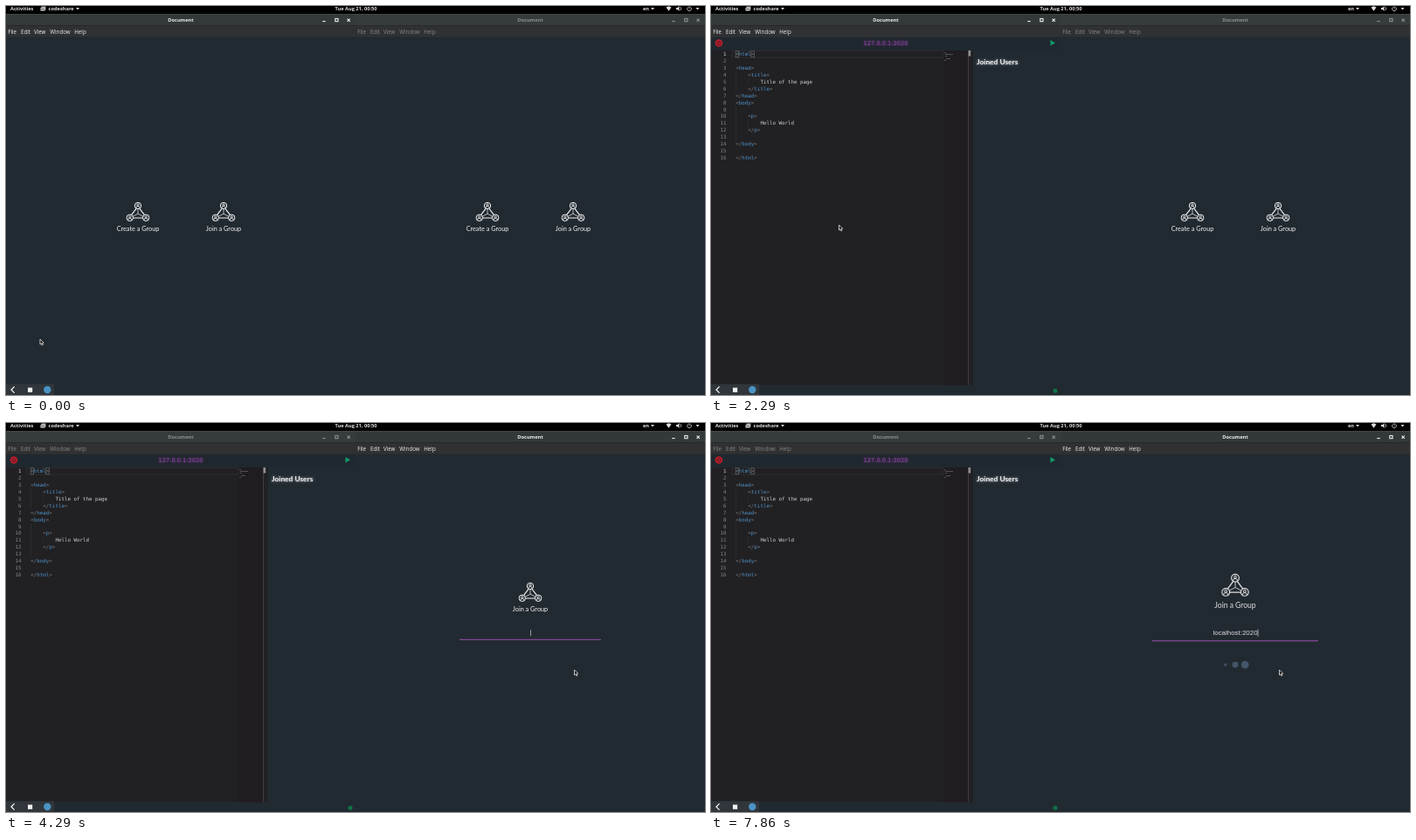
These frames come from a looping animation (800x446 px, 8 s). An HTML page with a canvas:

```html
<!DOCTYPE html>
<html lang="en">
<head>
<meta charset="utf-8">
<title>Document</title>
<style>
html, body { margin: 0; width: 100%; height: 100%; overflow: hidden; background: #222a31; }
canvas { display: block; width: 800px; height: 446px; }
</style>
</head>
<body>
<canvas id="stage"></canvas>
<script>
const W = 800, H = 446, LOOP = 8000, FPS = 7;
const canvas = document.getElementById('stage');
const ctx = canvas.getContext('2d');
const ratio = window.devicePixelRatio || 1;
canvas.width = W * ratio;
canvas.height = H * ratio;

const UI = '"Open Sans", sans-serif';
const LABEL = 'Lato, sans-serif';
const MONO = '"DejaVu Sans Mono", monospace';
const INPUT = '"Liberation Sans", sans-serif';
const BG = '#222a31';
const CENTER_Y = 240.5;

const CODE = [
  '<html>', '', '<head>', '    <title>', '        Title of the page', '    </title>', '</head>',
  '<body>', '', '    <p>', '        Hello World', '    </p>', '', '</body>', '', '</html>'
];

const clamp = v => Math.max(0, Math.min(1, v));
const ramp = (t, start, length) => clamp((t - start) / length);
const smooth = p => p * p * (3 - 2 * p);
const mix = (a, b, p) => a + (b - a) * p;

function rect(x, y, w, h, color) {
  ctx.fillStyle = color;
  ctx.fillRect(x, y, w, h);
}

function dot(x, y, r, color) {
  ctx.fillStyle = color;
  ctx.beginPath();
  ctx.arc(x, y, r, 0, Math.PI * 2);
  ctx.fill();
}

function path(points, { fill, stroke, width = 1, close = false }) {
  ctx.beginPath();
  points.forEach(([x, y], i) => i ? ctx.lineTo(x, y) : ctx.moveTo(x, y));
  if (close) ctx.closePath();
  if (fill) { ctx.fillStyle = fill; ctx.fill(); }
  if (stroke) { ctx.strokeStyle = stroke; ctx.lineWidth = width; ctx.stroke(); }
}

function text(str, x, y, font, color, align = 'left') {
  ctx.font = font;
  ctx.fillStyle = color;
  ctx.textAlign = align;
  ctx.fillText(str, x, y);
}

function layer(alpha, draw) {
  if (alpha <= 0) return;
  ctx.save();
  ctx.globalAlpha *= alpha;
  draw();
  ctx.restore();
}

function downArrow(x, y) {
  path([[x - 2, y - 1], [x + 2, y - 1], [x, y + 1.4]], { fill: '#ddd', close: true });
}

function topBar() {
  const font = 'bold 5.7px ' + UI, color = '#dedede';
  rect(0, 0, W, 9, '#000');
  text('Activities', 5, 5.1, font, color);
  rect(40.5, 0.5, 5, 4, '#aaa');
  rect(39.5, 2, 5, 3.5, '#ccc');
  rect(40.3, 3.2, 3.4, 0.7, '#333');
  text('codeshare', 48.5, 5.1, font, color);
  downArrow(82, 3);
  text('Tue Aug 21, 00:50', 400.5, 5.1, font, color, 'center');
  text('en', 729, 5.1, font, color);
  downArrow(740, 3);
  downArrow(791.5, 3);
  path([[755.5, 1.6], [758.5, 0.3], [761.5, 1.6], [758.5, 5.8]], { fill: color, close: true });
  path([[767, 2], [768.5, 2], [770.5, 0.3], [770.5, 5.7], [768.5, 4], [767, 4]], { fill: color, close: true });
  ctx.strokeStyle = color;
  ctx.lineWidth = 0.8;
  ctx.beginPath();
  ctx.arc(770, 3, 2.6, -0.9, 0.9);
  ctx.stroke();
  ctx.beginPath();
  ctx.arc(782, 3.2, 2.4, -0.9, Math.PI + 0.9);
  ctx.stroke();
  rect(781.6, 0.3, 0.8, 2.6, color);
}

function windowFrame(x, active) {
  const color = active ? '#eee' : '#8d9090';
  rect(x, 9, 400, 14, active ? '#33383a' : '#363b3d');
  rect(x, 9, 400, 0.8, '#45494a');
  rect(x, 22.4, 400, 0.8, '#1d2021');
  text('Document', x + 200, 18.3, 'bold 5.7px ' + UI, color, 'center');
  rect(x + 362.3, 17, 3.4, 1.1, color);
  ctx.strokeStyle = color;
  ctx.lineWidth = 1.1;
  ctx.strokeRect(x + 376.8, 14.5, 3.2, 3.2);
  path([[x + 390.6, 14.6], [x + 393.8, 17.8]], { stroke: color, width: 1.1 });
  path([[x + 393.8, 14.6], [x + 390.6, 17.8]], { stroke: color, width: 1.1 });
  rect(x, 23, 400, 12.5, '#303132');
  const items = { File: 2.3, Edit: 17, View: 32, Window: 50.3, Help: 78.3 };
  for (const name in items) text(name, x + items[name], 31.7, '6.2px ' + UI, active ? '#eee' : '#858787');
}

function person(x, y) {
  ctx.strokeStyle = '#f4f4f4';
  ctx.lineWidth = 1;
  ctx.beginPath();
  ctx.arc(x, y, 3.7, 0, Math.PI * 2);
  ctx.stroke();
  ctx.lineWidth = 0.8;
  ctx.beginPath();
  ctx.arc(x, y - 0.9, 1.2, 0, Math.PI * 2);
  ctx.stroke();
  ctx.beginPath();
  ctx.arc(x, y + 2.7, 2.2, Math.PI, 0);
  ctx.stroke();
}

function groupIcon(x, y) {
  const line = { stroke: '#f4f4f4', width: 1.1 };
  path([[x - 2, y - 3.7], [x - 7.3, y + 3.4]], line);
  path([[x + 2, y - 3.7], [x + 7.3, y + 3.4]], line);
  path([[x - 5.4, y + 7], [x + 5.4, y + 7]], line);
  const thin = { stroke: '#d8dadb', width: 0.8 };
  path([[x, y - 3.2], [x, y + 2.2], [x - 5.8, y + 5.3]], thin);
  path([[x, y + 2.2], [x + 5.8, y + 5.3]], thin);
  person(x, y - 7);
  person(x - 9.2, y + 6.8);
  person(x + 9.2, y + 6.8);
}

function groupButton(name, x, y, hover) {
  if (hover) rect(x - 28, y - 19, 56, 50, '#1f262c');
  groupIcon(x, y);
  text(name + ' a Group', x, y + 22, '7.3px ' + LABEL, '#f4f4f4', 'center');
}

// Three pulsing dots, each trailing the one to its left.
function loader(x, t) {
  for (let i = 0; i < 3; i++) {
    const phase = (((t + 0.32 - i * 0.16) % 1.4) + 1.4) % 1.4;
    const scale = smooth(clamp(1 - Math.abs(phase - 0.56) / 0.56));
    dot(x + (i - 1) * 9.5, 271.7, 3.75 * scale, '#465b6e');
  }
}

function zoomed(x, age, draw) {
  const scale = 1 + 53 * Math.max(0, age) ** 2;
  layer(clamp(1 - 1.75 * Math.max(0, age)), () => {
    if (scale > 2) ctx.filter = 'blur(1px)';
    ctx.translate(x, CENTER_Y);
    ctx.scale(scale, scale);
    ctx.translate(-x, -CENTER_Y);
    draw();
  });
}

// The chosen button glides to the middle while the other one fades.
function menu(x, chosen, move, hover) {
  const places = { Create: x + 151, Join: x + 249 };
  for (const name in places) {
    const picked = name === chosen;
    const drift = name === 'Join' ? -1 : 1;
    const px = places[name] + drift * move * (picked ? 49 : 21);
    const py = 236 - (picked ? 42 * move : 0);
    layer(picked ? 1 : 1 - Math.min(1, move * 0.95 + (move === 1)), () =>
      groupButton(name, px, py, picked && hover));
  }
}

function codeLine(line, i) {
  const y = 57.1 + i * 7.93, size = '5.83px ' + MONO;
  text(String(i + 1), 17.6, y, size, i ? '#858585' : '#c6c6c6', 'right');
  const body = line.trimStart();
  const step = 3.51;
  let x = 28.3 + (line.length - body.length) * step;
  const tag = body.startsWith('<');
  for (const part of tag ? body.split(/(<\/?|>)/) : [body]) {
    const color = !tag ? '#cfcfcf' : /[<>]/.test(part) ? '#7d7f80' : '#4f93c9';
    text(part, x, y, size, color);
    x += part.length * step;
  }
}

function editor() {
  rect(0, 35.5, 400, 15.5, '#20282f');
  rect(0, 51, 300, 383.5, '#212023');
  rect(266, 51, 28, 383.5, '#1f1d20');
  rect(294, 51, 1, 383.5, '#423d40');
  rect(294.6, 51, 2.6, 6.5, '#8f8f90');
  ctx.strokeStyle = '#302f32';
  ctx.lineWidth = 0.8;
  ctx.strokeRect(24, 51.5, 242, 7.6);
  rect(28.3, 75, 0.5, 24, '#353538');
  rect(28.3, 115, 0.5, 40, '#353538');
  rect(42.4, 83, 0.5, 8, '#353538');
  rect(42.4, 130.5, 0.5, 8, '#353538');
  ctx.strokeStyle = '#77797a';
  ctx.lineWidth = 0.6;
  ctx.strokeRect(28.2, 51.8, 3.6, 7);
  ctx.strokeRect(45.8, 51.8, 3.6, 7);
  CODE.forEach(codeLine);
  [[267, 53.5, 2], [268, 55, 9], [268, 57, 2], [269, 60, 5], [267, 62, 2]]
    .forEach(([x, y, w]) => rect(x, y, w, 0.7, '#66686a'));

  dot(9, 42.5, 4.3, '#b51f2b');
  ctx.strokeStyle = '#4b1820';
  ctx.lineWidth = 0.8;
  ctx.beginPath();
  ctx.arc(9, 42.8, 2, -0.9, Math.PI + 0.9);
  ctx.stroke();
  rect(8.6, 40, 0.8, 2.6, '#4b1820');
  path([[388.5, 39], [394, 42.2], [388.5, 45.4]], { fill: '#109a68', close: true });
  dot(394, 441.3, 2.5, '#0d7446');

  ctx.save();
  ctx.shadowBlur = 3 * ratio;
  ctx.shadowColor = '#8a3aa0';
  text('127.0.0.1:2020', 200, 45.3, '6.65px "DejaVu Sans", sans-serif', '#8d44a3', 'center');
  ctx.shadowColor = '#b8c0c6';
  text('Joined Users', 304, 66.7, 'bold 8.4px ' + LABEL, '#f2f2f2');
  ctx.restore();
}

function dock() {
  rect(0, 433.5, 55, 12.5, '#30363b');
  path([[9.6, 436.3], [6, 440], [9.6, 443.7]], { stroke: '#fff', width: 1.2 });
  rect(25, 437.6, 5.2, 5.2, '#f0f0f0');
  dot(47.3, 440, 4.2, '#4a93c4');
}

function typed(t) {
  const fast = Math.floor(ramp(t, 4.28, 0.86) * 8 + 0.01);
  if (t < 5.9) return fast;
  if (t >= 6.85) return 14;
  return Math.min(13, 9 + Math.floor((t - 5.95) * 9.2));
}

function addressField(x, t) {
  layer(ramp(t, 3.6, 0.4), () => {
    rect(x - 81, 247.8, 162, 1.1, '#8d4c9e');
    const value = 'localhost:2020'.slice(0, typed(t));
    text(value, x, 243, '6.75px ' + INPUT, '#eceeef', 'center');
    if (t > 4.2) rect(x + ctx.measureText(value).width / 2 + 0.1, 237.2, 0.6, 7, '#e8e8e8');
  });
}

function leftContent(t) {
  const age = t - 1.51;
  zoomed(200, age, () => {
    menu(0, 'Create', ramp(t, 1.15, 0.2), t > 0.8 && t < 1.2);
    if (t > 1.2) loader(200, t - 0.33);
  });
  layer(ramp(t, 1.57, 0.6), editor);
}

function rightContent(t) {
  zoomed(600, t - 7.8, () => {
    menu(400, 'Join', ramp(t, 3.2, 0.2), t > 2.95 && t < 3.2);
    addressField(600, t);
    if (t > 6.8) loader(600, t - 7.29);
  });
}

function pointerAt(t) {
  if (t < 2.3) {
    const p = smooth(ramp(t, 0, 1));
    return [mix(39, 146.5, p), mix(382, 251, p)];
  }
  if (t < 3.2) {
    const p = smooth(ramp(t, 2.29, 0.71));
    return [mix(146.5, 656.5, p), mix(251, 253, p) + 18 * Math.sin(Math.PI * p)];
  }
  const down = smooth(ramp(t, 3.25, 0.32)), back = smooth(ramp(t, 3.57, 0.72));
  return [mix(656.5, 660, down) - 9.5 * back, mix(253, 302, down) - 19 * back];
}

function pointer(t) {
  const [x, y] = pointerAt(t);
  const hand = (t > 0.8 && t < 1.2) || (t > 2.95 && t < 3.2);
  const shape = hand
    ? [[0, 0], [1, 0], [1.3, 2.4], [4, 3.1], [4, 5.5], [3.2, 7], [0.4, 7], [-1.8, 4], [-1, 3.4], [0, 4.3]]
    : [[0, 0], [0, 6], [1.4, 4.8], [2.4, 7], [3.4, 6.5], [2.4, 4.4], [4.2, 4.2]];
  path(shape.map(([px, py]) => [x + px, y + py]),
    { fill: hand ? '#f0f0f0' : '#111', stroke: hand ? '#30363b' : '#e6e6e6', width: 0.8, close: true });
}

function pane(x, draw) {
  ctx.save();
  ctx.beginPath();
  ctx.rect(x, 35.5, 400, H - 35.5);
  ctx.clip();
  draw();
  ctx.restore();
}

function draw(t) {
  ctx.setTransform(ratio, 0, 0, ratio, 0, 0);
  rect(0, 0, W, H, BG);
  pane(0, () => leftContent(t));
  pane(400, () => rightContent(t));
  const rightActive = t > 3.2;
  windowFrame(0, !rightActive);
  windowFrame(400, rightActive);
  topBar();
  dock();
  pointer(t);
}

const start = performance.now();
let shown = -1;
function tick() {
  const ms = Math.max(0, performance.now() - start) % LOOP;
  const step = Math.min(LOOP / 1000 * FPS - 1, Math.floor((ms + 5) * FPS / 1000));
  if (step !== shown) {
    shown = step;
    draw(step / FPS);
  }
  requestAnimationFrame(tick);
}
tick();
</script>
</body>
</html>
```
